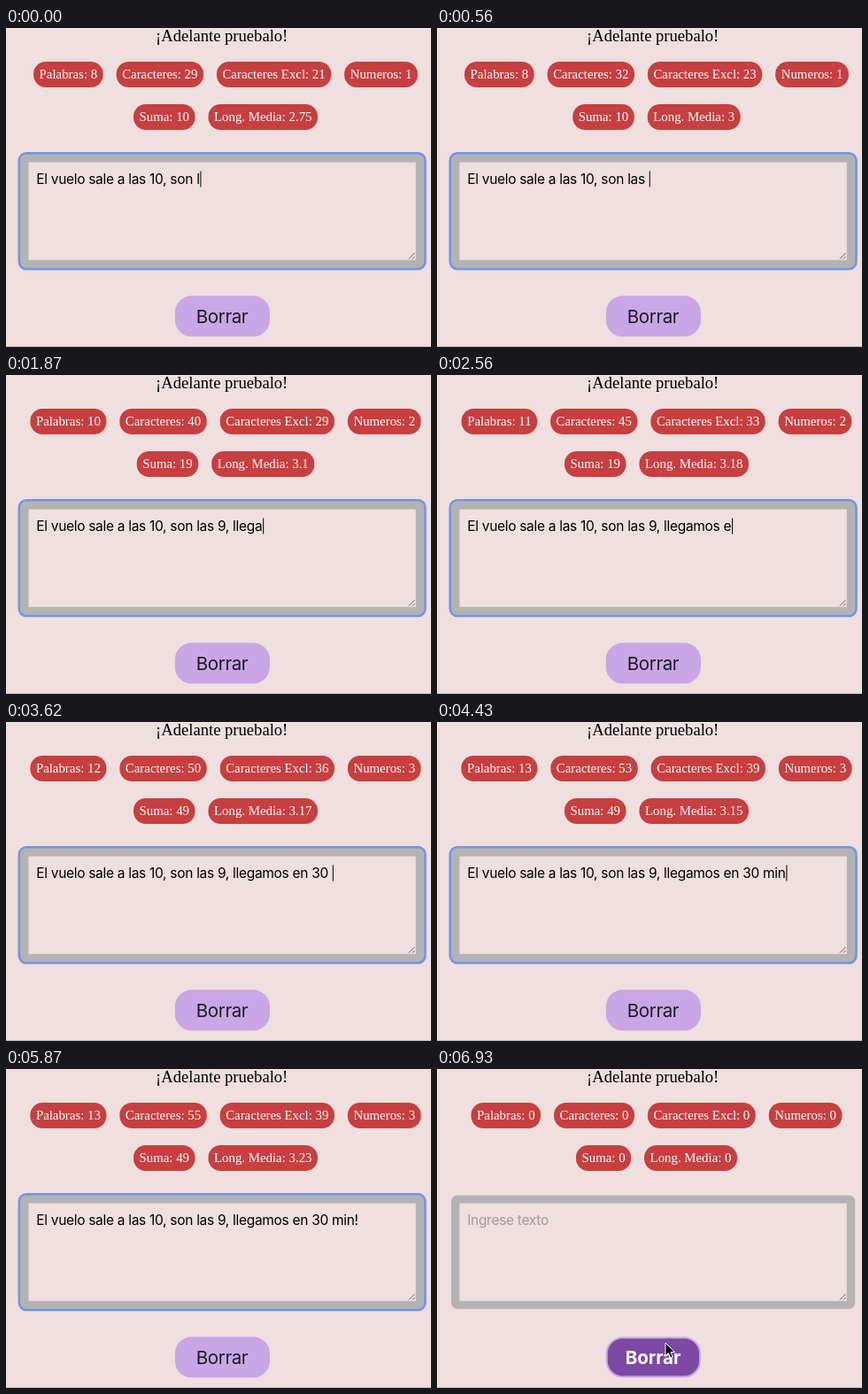
Animation, 480 px wide and 360 px high, one loop 7 s. Source, as an HTML page:

```html
<!DOCTYPE html>
<html lang="es">
<head>
<meta charset="utf-8">
<title>Contador de texto</title>
<style>
  html, body { margin: 0; width: 100%; height: 100%; overflow: hidden; background: #efdfde; }
  svg { display: block; width: 100vw; height: 100vh; }
  text { white-space: pre; }
  .serif { font-family: "Liberation Serif", Times, serif; }
  .sans { font-family: Inter, "Liberation Sans", sans-serif; }
  .pill { font-size: 14.85px; fill: #fff; }
  #typed, #hint { font-size: 15.5px; letter-spacing: -.3px; }
  #label { font-size: 20.5px; letter-spacing: -.4px; text-anchor: middle; }
  #label.hover { font-weight: 700; letter-spacing: -.1px; }
</style>
</head>
<body>
<svg viewBox="0 0 480 360">
  <rect width="480" height="360" fill="#efdfde"/>
  <rect y="359" width="480" height="1" fill="#c0b6b6"/>
  <text class="serif" x="243.7" y="15" font-size="18.6" text-anchor="middle">¡Adelante pruebalo!</text>
  <g id="pills"></g>

  <rect id="ring" x="13.5" y="140" width="461.3" height="133.3" rx="9.5" fill="#7096e4"/>
  <rect x="16" y="142.4" width="456.2" height="128.4" rx="7" fill="#b4b3b3"/>
  <rect x="25.5" y="151.6" width="437.3" height="110.2" fill="#efdfde"/>
  <path d="M455 260.5L461.5 254M459 260.5L461.5 258" stroke="#555" stroke-width=".9"/>
  <text id="hint" class="sans" x="34.2" y="175.7" fill="#a39c9c">Ingrese texto</text>
  <text id="typed" class="sans" x="34.2" y="175.7"></text>
  <rect id="caret" y="161.5" width="1" height="18"/>

  <rect id="button" x="191.8" y="303.2" width="105.2" height="44" rx="18" stroke="#c9a6e6" stroke-width="2"/>
  <text id="label" class="sans" x="244" y="333">Borrar</text>
  <path id="mouse" d="M0 0V14.6L3.3 11.5L5.7 17L8.2 15.9L5.9 10.5H10.4Z" stroke="#fff" stroke-width="1"/>
</svg>
<script>
const LOOP = 7000, HOVER = 6080, CLEAR = 6500, MOUSE_IN = 5930;
const PHRASE = 'El vuelo sale a las 10, son las 9, llegamos en 30 min! ';
const TYPING = [[0, 29], [1250, 36], [2560, 45], [3620, 50], [4430, 53], [5100, 55]];
const LAST_KEY = 4932;
const MOUSE_PATH = [[MOUSE_IN, 292, 262], [6110, 264, 331], [6420, 258, 309]];
const ROW_CENTER = 248, PAD = 6.55, GAP = 14.9;

const $ = id => document.getElementById(id);
const show = (el, on) => el.setAttribute('visibility', on ? 'visible' : 'hidden');
const clamp = v => Math.min(1, Math.max(0, v));
const ease = v => v * v * (3 - 2 * v);
const mix = (a, b, k) => a + (b - a) * k;
const rgb = (a, b, k) => `rgb(${a.map((v, i) => Math.round(mix(v, b[i], k)))})`;

// Value of column c in a list of [time, ...values] keys
function along(keys, t, c, curve = v => v) {
  let i = 0;
  while (i < keys.length - 2 && t >= keys[i + 1][0]) i++;
  const [a, b] = [keys[i], keys[i + 1]];
  return mix(a[c], b[c], curve(clamp((t - a[0]) / (b[0] - a[0]))));
}

function make(tag, attrs) {
  const el = document.createElementNS('http://www.w3.org/2000/svg', tag);
  for (const name in attrs) el.setAttribute(name, attrs[name]);
  return $('pills').appendChild(el);
}

const makePill = y => ({
  box: make('rect', { y, height: 29, rx: 14, fill: '#c73f40' }),
  text: make('text', { y: y + 19, class: 'serif pill' })
});
const rows = [[38, 4], [86, 2]].map(([y, n]) => Array.from({ length: n }, () => makePill(y)));

function layRow(row, labels) {
  const widths = row.map((pill, i) => {
    pill.text.textContent = labels[i];
    return pill.text.getComputedTextLength() + 2 * PAD;
  });
  let x = ROW_CENTER - (widths.reduce((a, b) => a + b) + GAP * (row.length - 1)) / 2;
  row.forEach(({ box, text }, i) => {
    box.setAttribute('x', x);
    box.setAttribute('width', widths[i]);
    text.setAttribute('x', x + PAD);
    x += widths[i] + GAP;
  });
}

function count(text) {
  const words = text.match(/\S+/g) || [];
  const numbers = text.match(/\d+/g) || [];
  const letters = text.replace(/[\s,!]/g, '').length;
  const sum = numbers.reduce((a, n) => a + Number(n), 0);
  const mean = words.length ? words.join('').length / words.length : 0;
  layRow(rows[0], [`Palabras: ${words.length}`, `Caracteres: ${text.length}`,
    `Caracteres Excl: ${letters}`, `Numeros: ${numbers.length}`]);
  layRow(rows[1], [`Suma: ${sum}`, `Long. Media: ${Number(mean.toFixed(2))}`]);
}

let shown = null;
function setText(text) {
  if (text === shown) return;
  shown = text;
  $('typed').textContent = text;
  $('caret').setAttribute('x', 35 + $('typed').getComputedTextLength());
  show($('hint'), !text);
  count(text);
}

function draw(t) {
  const focused = t < CLEAR;
  setText(focused ? PHRASE.slice(0, Math.floor(along(TYPING, t, 1) + .5)) : '');
  show($('ring'), focused);
  show($('caret'), focused && (t < LAST_KEY || (t - LAST_KEY) % 1000 < 500));

  const hover = clamp((t - HOVER) / 200);
  $('button').setAttribute('fill', rgb([201, 166, 230], [125, 73, 165], hover));
  $('label').setAttribute('fill', rgb([31, 26, 34], [255, 255, 255], hover));
  $('label').classList.toggle('hover', t >= HOVER);

  show($('mouse'), t >= MOUSE_IN);
  const [x, y] = [1, 2].map(c => along(MOUSE_PATH, t, c, ease));
  $('mouse').setAttribute('transform', `translate(${x} ${y})`);
}

const start = performance.now();
function tick(now) {
  draw(Math.max(0, now - start) % LOOP);
  requestAnimationFrame(tick);
}
draw(0);
requestAnimationFrame(tick);
</script>
</body>
</html>
```
